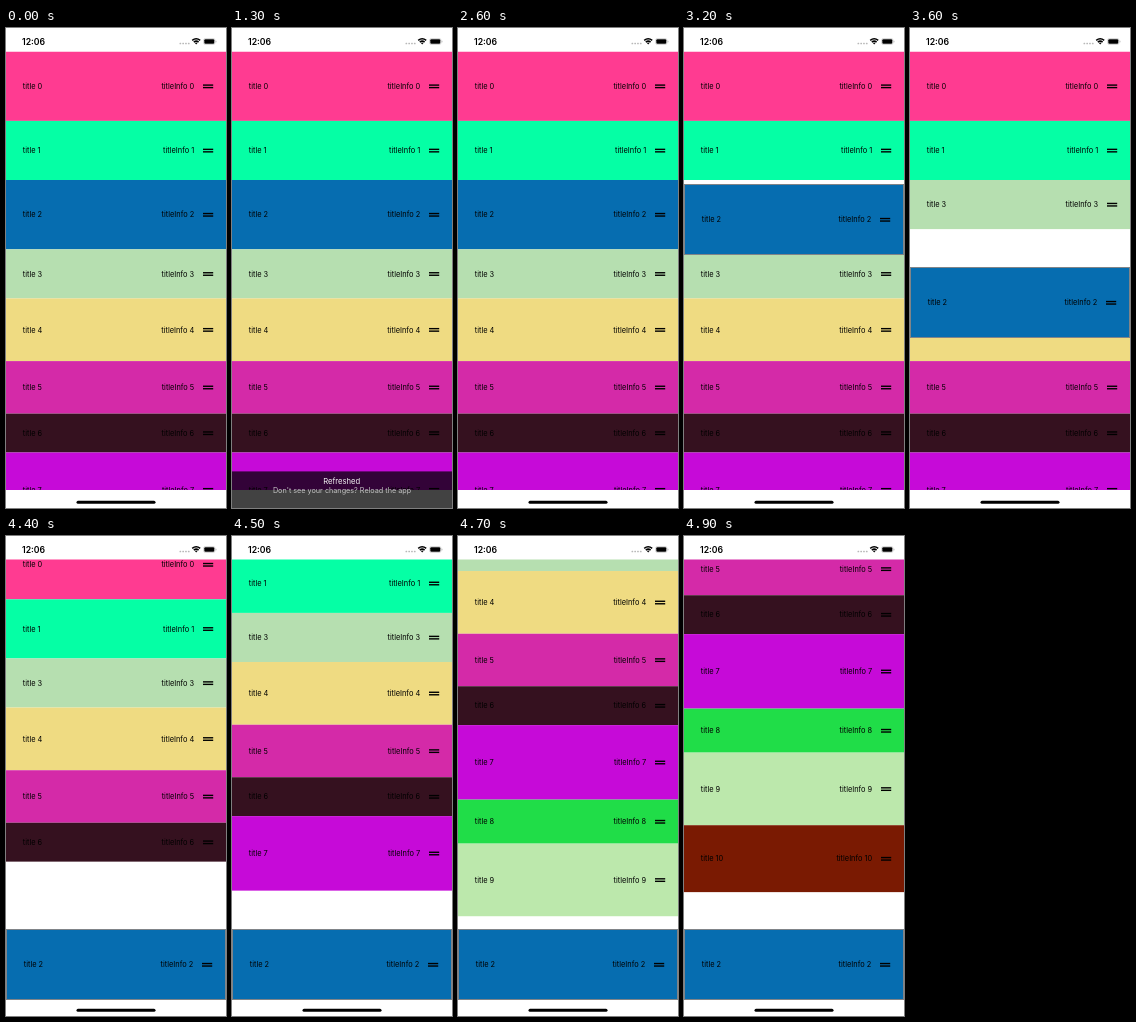
An HTML page that plays this animation: 220 px wide and 480 px high, repeating every 5 s.

```html
<!DOCTYPE html>
<html lang="en">
<head>
<meta charset="utf-8">
<title>Draggable list</title>
<style>
  html, body { margin: 0; width: 100%; height: 100%; overflow: hidden; background: #fff; }
  svg { display: block; width: 220px; height: 480px; }
  text { font-family: Inter, Roboto, sans-serif; font-size: 7.4px; }
</style>
</head>
<body>
<svg viewBox="0 0 220 480">
  <defs>
    <clipPath id="view"><rect y="23.5" width="220" height="438.5"/></clipPath>
  </defs>
  <rect width="220" height="480" fill="#fff"/>
  <g clip-path="url(#view)"><g id="list"></g></g>
  <g id="active"></g>

  <text x="16" y="16.9" style="font-size:8.7px;font-weight:600">12:06</text>
  <g fill="#b8b8b8">
    <rect x="173.5" y="14.8" width="1.7" height="1.5" rx=".5"/>
    <rect x="176.3" y="14.8" width="1.7" height="1.5" rx=".5"/>
    <rect x="179.1" y="14.8" width="1.7" height="1.5" rx=".5"/>
    <rect x="181.9" y="14.8" width="1.7" height="1.5" rx=".5"/>
  </g>
  <g fill="none" stroke="#000" stroke-width="1.5">
    <path d="M186.2 12.4Q190.2 9 194.2 12.4"/>
    <path d="M187.8 14.1Q190.2 12.1 192.6 14.1"/>
  </g>
  <path d="M188.9 15.1Q190.2 14.1 191.5 15.1L190.2 16.5Z"/>
  <rect x="197.6" y="10.5" width="11.4" height="6" rx="1.8" fill="none" stroke="#b0b0b0" stroke-width=".5"/>
  <rect x="198.3" y="11.2" width="10" height="4.6" rx="1.1"/>
  <rect x="209.6" y="12.5" width=".8" height="2" rx=".4" fill="#b0b0b0"/>

  <rect id="home" x="70.5" y="472.8" width="79" height="3" rx="1.5"/>
  <g id="toast" text-anchor="middle">
    <rect y="443.4" width="220" height="36.6" fill="#000" fill-opacity=".74"/>
    <text x="109.7" y="456" fill="#f4f4f4" style="font-size:7.65px">Refreshed</text>
    <text x="110" y="465.3" fill="#c4c4c4" style="font-size:7.24px">Don't see your changes? Reload the app</text>
  </g>
</svg>
<script>
const LOOP = 5000, STEP = 100, TOP = 23.5, DRAGGED = 2, BORDER = 1;

// [height, colour] of each row
const ROWS = [
  [69.4, '#ff3b91'], [59.1, '#05ffa5'], [69.3, '#066db0'], [49.1, '#b6dfb0'],
  [62.7, '#efdb82'], [52.5, '#d42aa8'], [38.9, '#35111f'], [74.5, '#c60ad8'],
  [44, '#20dd48'], [72.6, '#bce8ac'], [66.9, '#7a1a02']
];

// [time, top of the dragged row]
const DRAG = [
  [3200, 156], [3300, 190], [3400, 215], [3600, 239], [3700, 298],
  [3800, 354], [4300, 376], [4400, 393]
];

const $ = id => document.getElementById(id);

function add(parent, tag, attrs, label = '') {
  const el = document.createElementNS('http://www.w3.org/2000/svg', tag);
  for (const key in attrs) el.setAttribute(key, attrs[key]);
  el.textContent = label;
  return parent.appendChild(el);
}

function drawRow(parent, i, inset = 0) {
  const [h, fill] = ROWS[i], mid = h / 2 + inset;
  const g = add(parent, 'g', {});
  add(g, 'rect', { y: inset, width: 220, height: h, fill });
  add(g, 'text', { x: 16.8 + inset, y: mid + 2.8 }, `title ${i}`);
  add(g, 'text', { x: 188.2 - inset, y: mid + 2.8, 'text-anchor': 'end' }, `titleInfo ${i}`);
  for (const dy of [-1.8, 0.7])
    add(g, 'rect', { x: 197 - inset, y: mid + dy, width: 10.2, height: 1.4 });
  return g;
}

const moveTo = (el, y) => el.setAttribute('transform', `translate(0 ${y})`);
const show = (el, on) => el.setAttribute('visibility', on ? 'visible' : 'hidden');

let y = TOP;
const rows = ROWS.map(([h], i) => {
  const row = { el: drawRow($('list'), i), top: y, h };
  y += h;
  return row;
});

const dragged = rows[DRAGGED];
const active = $('active');
drawRow(active, DRAGGED, BORDER);
add(active, 'rect', {
  x: BORDER / 2, y: BORDER / 2, width: 220 - BORDER, height: 70,
  fill: 'none', stroke: '#808488', 'stroke-width': BORDER
});

function render(t) {
  const held = DRAG.filter(([at]) => at <= t).pop();
  const scroll = Math.max(0, t - 4335) * 0.455;
  const center = held ? held[1] + BORDER + dragged.h / 2 : 0;

  rows.forEach(({ el, top, h }, i) => {
    // rows passed by the dragged one close the space it left
    const passed = held && i > DRAGGED && top + h / 2 - scroll < center;
    moveTo(el, top - scroll - (passed ? dragged.h : 0));
  });
  show(dragged.el, !held);
  show(active, held);
  if (held) moveTo(active, held[1]);

  const toast = t >= 1300 && t < 1600;
  show($('toast'), toast);
  show($('home'), !toast);
}

const start = performance.now();
function tick() {
  const t = (performance.now() - start) % LOOP;
  render(Math.floor(t / STEP) * STEP);
  requestAnimationFrame(tick);
}
tick();
</script>
</body>
</html>
```
